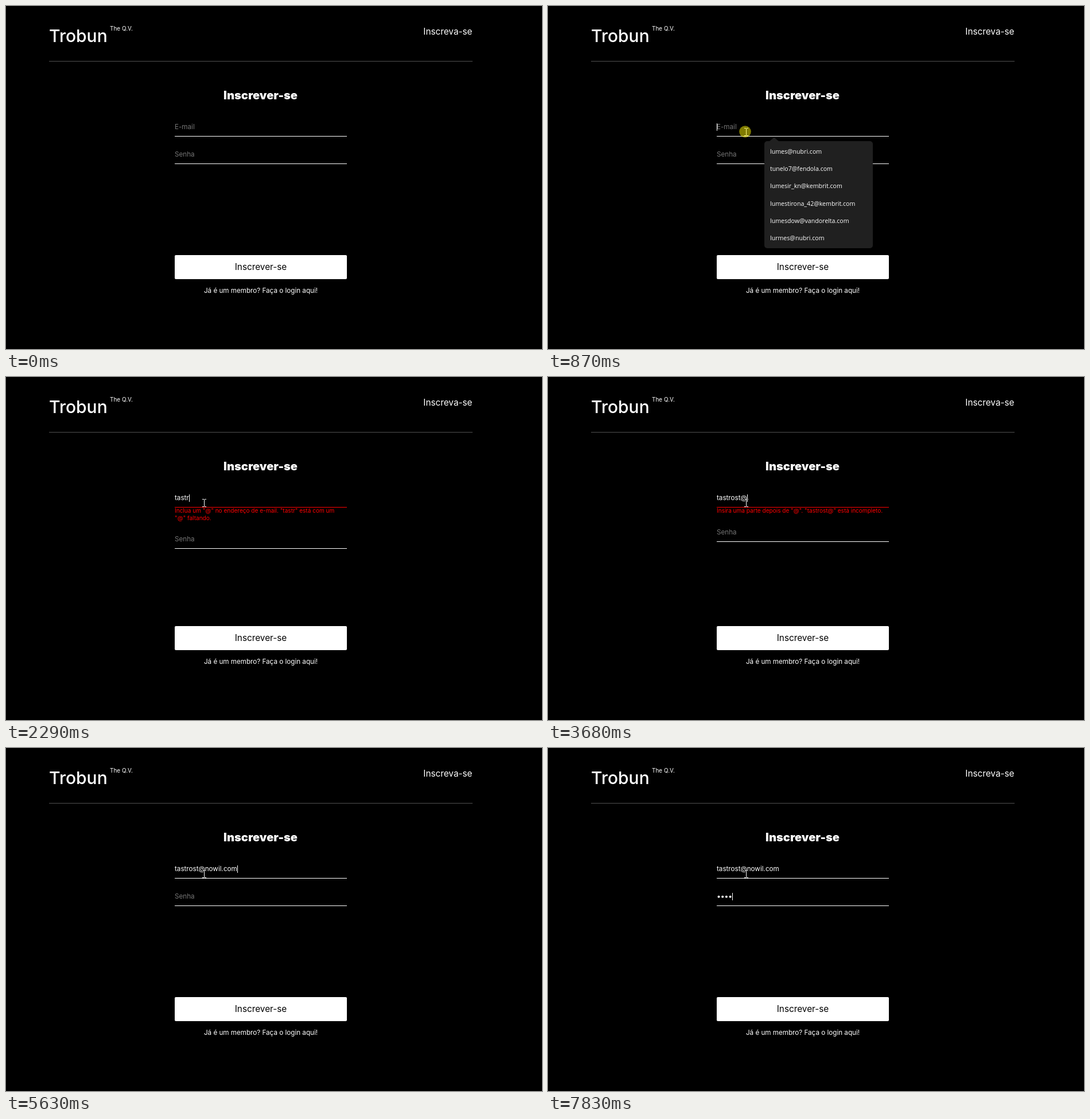
These frames come from a looping animation (934 px wide and 599 px high, 8 s). An HTML page with a canvas:

```html
<!DOCTYPE html>
<html lang="pt-BR">
<head>
<meta charset="utf-8">
<title>Inscrever-se</title>
<style>
html, body { margin: 0; width: 100%; height: 100%; overflow: hidden; background: #000; }
canvas { display: block; }
</style>
</head>
<body>
<canvas id="stage" width="934" height="599"></canvas>
<script>
const ctx = document.getElementById('stage').getContext('2d');
const LOOP = 8000;
const LEFT = 294, FIELD = 300;
const SANS = 'Inter, sans-serif';
const MENU_FONT = '10.6px "Open Sans", sans-serif';
const BODY = '11.65px ' + SANS;
const LARGE = '15.3px ' + SANS;
const SMALL = '10.05px ' + SANS;
const WHITE = '#fff', GREY = '#757575', RED = '#f00';

const EMAIL = 'tastrost@nowil.com';
const KEYS = [1420, 1620, 1760, 1890, 2290, 2420, 2560, 2620, 3150,
  4220, 4570, 4700, 4820, 5020, 5220, 5290, 5430, 5630];
const DOTS = [7300, 7440, 7630, 7830];
const FOCUS = 800, TAB = 6370, BLINK = 535;
const SUGGESTIONS = [
  'lumes@nubri.com', 'tunelo7@fendola.com', 'lumesir_kn@kembrit.com',
  'lumestirona_42@kembrit.com', 'lumesdow@vandorelta.com', 'lurmes@nubri.com'
];

function text(str, x, y, font, color = WHITE, align = 'left') {
  ctx.font = font;
  ctx.fillStyle = color;
  ctx.textAlign = align;
  ctx.fillText(str, x, y);
}

function rect(x, y, w, h, color) {
  ctx.fillStyle = color;
  ctx.fillRect(x, y, w, h);
}

function rounded(x, y, w, h, r, color) {
  ctx.fillStyle = color;
  ctx.beginPath();
  ctx.roundRect(x, y, w, h, r);
  ctx.fill();
}

function disc(x, y, r, color) {
  ctx.fillStyle = color;
  ctx.beginPath();
  ctx.arc(x, y, r, 0, Math.PI * 2);
  ctx.fill();
}

const passed = (times, t) => times.filter(k => k <= t).length;

function emailError(value) {
  if (!value) return [];
  if (!value.includes('@')) {
    const start = `Inclua um "@" no endereço de e-mail. "${value}" está com um`;
    return value.length > 4 ? [start, '"@" faltando.'] : [start + ' "@"', 'faltando.'];
  }
  if (value.endsWith('@'))
    return [`Insira uma parte depois de "@". "${value}" está incompleto.`];
  if (value.endsWith('.')) {
    const host = value.split('@')[1];
    return [`"." está sendo usado em uma posição incorreta em "${host}".`];
  }
  return [];
}

function passwordError(count) {
  return count === 1
    ? ['Aumente esse texto para 2 caracteres ou mais (no', 'momento, você está usando 1 caractere).']
    : [];
}

function drawErrors(lines, y) {
  lines.forEach((line, i) => text(line, LEFT, y + i * 12.5, SMALL, RED));
}

function drawPage() {
  rect(0, 0, 934, 599, '#000');
  text('Trobun', 75, 63, '500 30px ' + SANS);
  text('The Q.V.', 181, 43, '10px ' + SANS);
  text('Inscreva-se', 812.5, 50, LARGE, WHITE, 'right');
  rect(75, 96, 738, 1, '#505050');
  text('Inscrever-se', 443.5, 163, '900 20.1px ' + SANS, WHITE, 'center');
  rounded(LEFT, 435, FIELD, 42, 2, WHITE);
  text('Inscrever-se', 444, 461, LARGE, '#000', 'center');
  text('Já é um membro? Faça o login aqui!', 444, 501, BODY, WHITE, 'center');
}

function drawCaret(x, y, t, since) {
  if (Math.floor((t - since) / BLINK) % 2 === 0) rect(Math.round(x), y, 1, 13, WHITE);
}

function drawForm(t) {
  const count = passed(KEYS, t);
  const value = EMAIL.slice(0, count);
  const errors = emailError(value);
  text(value || 'E-mail', LEFT, 215, BODY, value ? WHITE : GREY);
  const end = LEFT + (value ? ctx.measureText(value).width : 0);
  rect(LEFT, 227, FIELD, 1, errors.length ? RED : WHITE);
  drawErrors(errors, 237);
  if (t >= FOCUS && t < TAB) drawCaret(end, 205, t, count ? KEYS[count - 1] : FOCUS);

  const shift = errors.length * 12;
  const dots = passed(DOTS, t);
  const warnings = passwordError(dots);
  if (!dots) text('Senha', LEFT, 263 + shift, BODY, GREY);
  for (let i = 0; i < dots; i++) disc(297.5 + i * 6.7, 259.7, 2, WHITE);
  rect(LEFT, 275 + shift, FIELD, 1, warnings.length ? RED : WHITE);
  drawErrors(warnings, 285);
  if (t >= TAB) drawCaret(LEFT + dots * 6.75, 253, t, dots ? DOTS[dots - 1] : TAB);
}

function drawMenu(t) {
  if (t < FOCUS || t >= 1550) return;
  const full = t < 1480;
  rounded(377, 236, full ? 189 : 149, full ? 187 : 71, full ? 5 : 1, '#202020');
  ctx.beginPath();
  ctx.moveTo(386, 236);
  ctx.lineTo(394, 229.5);
  ctx.lineTo(402, 236);
  ctx.fill();
  SUGGESTIONS.slice(0, full ? 6 : 2)
    .forEach((s, i) => text(s, 387, 258 + i * 30.2, MENU_FONT));
}

function drawArrow(x, y) {
  const shape = [[0, 0], [0, 16], [4, 12.5], [6.5, 18], [9, 17], [6.5, 11.5], [11.5, 11.5]];
  ctx.beginPath();
  shape.forEach(([dx, dy]) => ctx.lineTo(x + dx, y + dy));
  ctx.closePath();
  ctx.fillStyle = WHITE;
  ctx.fill();
  ctx.strokeStyle = '#000';
  ctx.lineWidth = 1;
  ctx.stroke();
}

// The text pointer inverts whatever lies below it.
function drawBeam(x, y) {
  ctx.globalCompositeOperation = 'difference';
  rect(x, y - 6, 1, 12, WHITE);
  for (const dy of [-7, 6]) {
    rect(x - 3, y + dy, 3, 1, WHITE);
    rect(x + 1, y + dy, 3, 1, WHITE);
  }
  ctx.globalCompositeOperation = 'source-over';
}

function drawPointer(t) {
  if (t < 200) return;
  const step = Math.floor((t - 200) / 67);
  const p = Math.min(1, step / 8);
  const ease = p * p * (3 - 2 * p);
  const x = Math.round(799 + (345 - 799) * ease);
  const y = Math.round(525 + (220 - 525) * ease);
  const overField = x > LEFT && x < LEFT + FIELD && y > 200 && y < 228;
  (overField ? drawBeam : drawArrow)(x, y);
  if (t >= FOCUS && t < 930) disc(343.5, 219.5, 10.3, 'rgba(255, 245, 0, 0.5)');
}

function frame(now) {
  const t = now % LOOP;
  drawPage();
  drawForm(t);
  drawMenu(t);
  drawPointer(t);
  requestAnimationFrame(frame);
}

requestAnimationFrame(frame);
</script>
</body>
</html>
```
